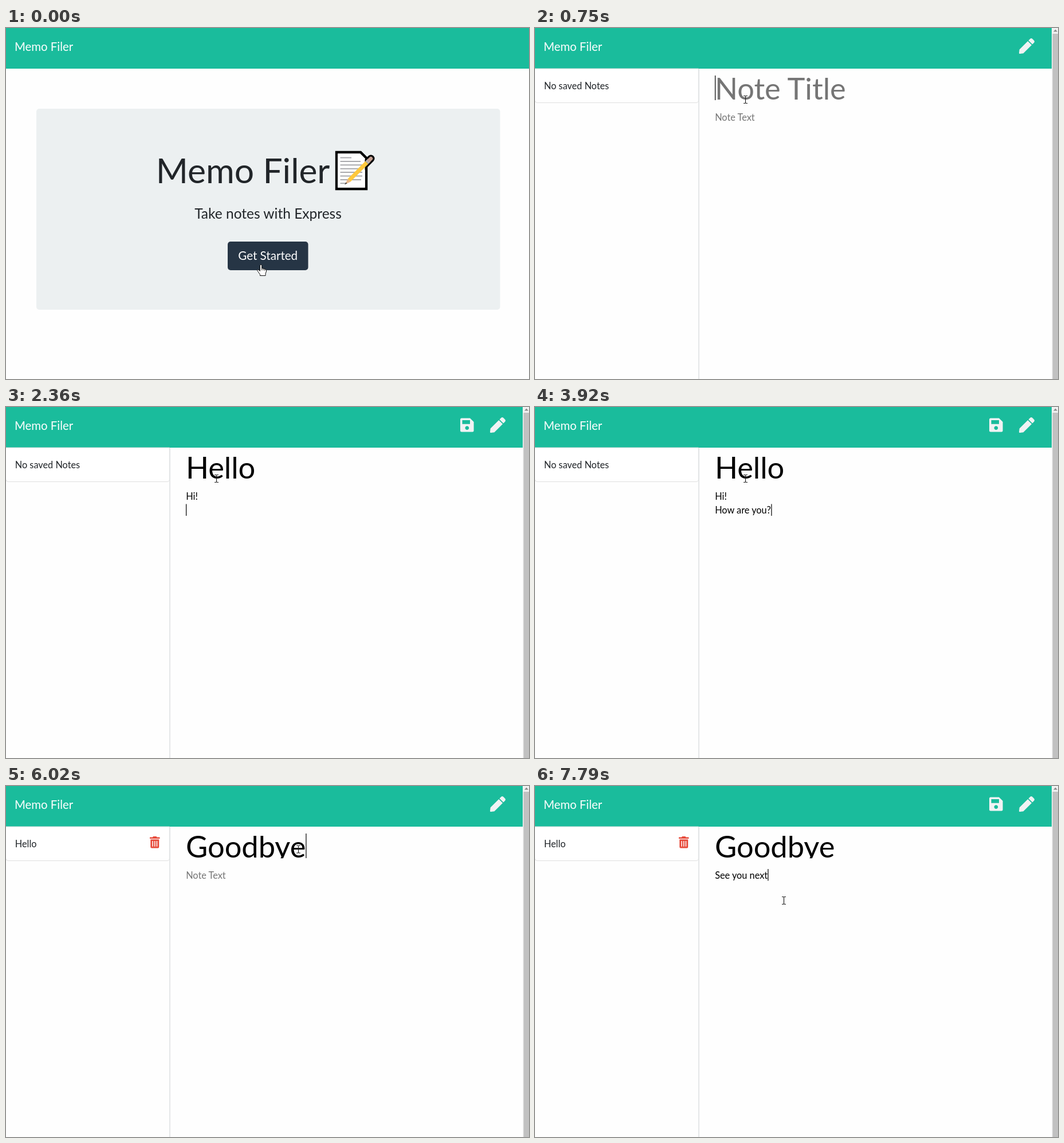
Recreate the animation shown at these times as an HTML page. Size 913 by 613 pixels, loop 8000 ms.

```html
<!DOCTYPE html>
<html lang="en">
<head>
<meta charset="utf-8">
<title>Memo Filer</title>
<style>
  html, body { margin: 0; width: 100%; height: 100%; overflow: hidden; background: #fefefe; }
  svg { display: block; width: 913px; height: 613px; }
  text { font-family: Lato, sans-serif; font-size: 16.3px; fill: #212529; white-space: pre; }
  .brand { font-size: 20.4px; fill: #fff; }
  .icon { fill: #f0f3f4; fill-rule: evenodd; }
  .big { font-size: 52.4px; }
</style>
</head>
<body>
<svg viewBox="0 0 913 613">
  <defs>
    <clipPath id="titleBox"><rect x="300" y="76" width="600" height="50.3"/></clipPath>
  </defs>
  <rect width="913" height="613" fill="#fefefe"/>
  <rect width="913" height="71" fill="#1abc9c"/>
  <text class="brand" x="14.9" y="40">Memo Filer</text>

  <g id="home">
    <rect x="53" y="141" width="809.5" height="351" rx="5" fill="#ecf0f1"/>
    <text x="261.8" y="271" style="font-size:60.5px">Memo Filer</text>
    <g id="memo">
      <path d="M577 217H619L629 227V281H577Z" fill="#fff" stroke="#000" stroke-width="4.4"/>
      <path id="lines" stroke="#a9a9ad" stroke-width="2"/>
      <path d="M603 262L637 228" stroke="#000" stroke-width="13" stroke-linecap="round"/>
      <path d="M579 219.5H618L626.5 228V278.500H579Z" fill="#fff"/>
      <use href="#lines"/>
      <path d="M599 266L630 235" stroke="#ffc83d" stroke-width="7"/>
      <path d="M630 235L634 231" stroke="#b4b4b8" stroke-width="7"/>
      <path d="M634 231L637 228" stroke="#c4a092" stroke-width="6.500" stroke-linecap="round"/>
      <path d="M596.5 263.500L601.5 268.500L592 273Z" fill="#e8b98c"/>
      <path d="M593.500 269.500L595.500 271.500L591 273.500Z" fill="#444"/>
    </g>
    <text x="457.5" y="332.500" text-anchor="middle" style="font-size:24.5px">Take notes with Express</text>
    <rect id="ring" x="384" y="370" width="146.500" height="56" rx="7" fill="#8c969f"/>
    <rect id="button" x="387" y="373" width="140.500" height="50" rx="5"/>
    <text x="457.200" y="405" text-anchor="middle" style="font-size:20.6px;fill:#fff">Get Started</text>
  </g>

  <g id="notes">
    <path d="M0 71H285.500V126Q285.500 130.500 281 130.500H4Q0 130.500 0 127" fill="#fff" stroke="#dfdfdf"/>
    <path d="M286 71V613" stroke="#dfe1e3" stroke-width="1.600"/>
    <text id="saved" x="15.8" y="106.800"></text>
    <path id="trash" fill="#e74c3c" fill-rule="evenodd"
      d="M251 89.500H256L257 88H262.500L263.500 89.500H268.500V92H251ZM252.300 93.300H267.200V106.500Q267.200 108.500 265.200 108.500H254.300Q252.300 108.500 252.300 106.500ZM255.300 96V105.800H256.800V96ZM259 96V105.800H260.500V96ZM262.700 96V105.800H264.200V96Z"/>
    <path class="icon" d="M860.300 22.900L867.100 29.700L852.500 44.300L846.500 45Q844.800 45.100 845 43.500L845.700 37.500ZM861.500 21.700L864.500 18.700Q866.300 17.200 868.100 18.700L871.300 21.900Q872.800 23.700 871.300 25.500L868.300 28.500Z"/>
    <path id="save" class="icon"
      d="M795.500 19.500H810L816.600 26V41Q816.600 43.500 814.100 43.500H795.500Q793 43.500 793 41V22Q793 19.500 795.500 19.500ZM796.500 23V29.700H810V23ZM804.800 33.200A3.400 3.400 0 1 0 804.900 33.200Z"/>
    <g clip-path="url(#titleBox)"><text id="title" class="big" x="314" y="125"></text></g>
    <text id="line1" x="314.2" y="161.600"></text>
    <text id="line2" x="314.2" y="186"></text>
    <rect id="caret" width="1.200" fill="#000"/>
    <rect x="902" width="11" height="613" fill="#f1f1f1"/>
    <rect x="903.500" y="10" width="9.500" height="603" fill="#c1c1c1"/>
    <path d="M905 6.500L908.500 2.500L912 6.500Z" fill="#8a8a8a"/>
  </g>

  <g id="hand">
    <path d="M-1.600 1.500Q0 -1 1.600 1.500V6.500L4 7L6.500 7.800L8.800 9Q9.800 9.500 9.500 12L8 16V19.500H-1.500V17.500L-5 12.500Q-7.500 9.500 -5.500 9Q-4.300 8.700 -1.600 11.500Z"
      fill="#fff" stroke="#111" stroke-linejoin="round"/>
    <path d="M1.600 6.500V10M4.200 7.300V10.300M6.700 8V10.800" stroke="#111" stroke-width=".9"/>
  </g>
  <path id="beam" d="M-3.500 -6.500H-1L0 -5.800L1 -6.500H3.500M0 -5.800V5.800M-3.500 6.500H-1L0 5.800L1 6.500H3.500" fill="none" stroke="#222" stroke-width="1.200"/>
  <path id="arrow" d="M0 0V14.200L3.300 11.200L5.600 16.500L8 15.400L5.700 10.300H10Z" fill="#fff" stroke="#111" stroke-linejoin="round"/>
</svg>
<script>
const LOOP = 8000;
const $ = id => document.getElementById(id);
const pen = document.createElement("canvas").getContext("2d");

// Each step lists only what changes at that time.
const steps = [
  { at: 0, page: "home", press: false, cursor: ["hand", 445, 413], saved: "No saved Notes",
    bin: false, title: "", line1: "", line2: "", focus: "title" },
  { at: 250, cursor: ["hand", 450, 400] },
  { at: 500, press: true },
  { at: 750, page: "notes", cursor: ["beam", 367.5, 125] },
  { at: 1320, title: "H" },
  { at: 1590, title: "Hel" },
  { at: 1840, title: "Hello" },
  { at: 2110, line1: "Hi", focus: "line1" },
  { at: 2360, line1: "Hi!", focus: "line2" },
  { at: 2610, line2: "H" },
  { at: 2880, line2: "How" },
  { at: 3150, line2: "How a" },
  { at: 3400, line2: "How are " },
  { at: 3670, line2: "How are yo" },
  { at: 3920, line2: "How are you?" },
  { at: 4170, cursor: ["arrow", 690, 54] },
  { at: 4420, cursor: ["hand", 802, 32] },
  { at: 4950, cursor: ["arrow", 802, 31.500], saved: "Hello", bin: true,
    title: "", line1: "", line2: "", focus: "" },
  { at: 5220, cursor: ["beam", 510.5, 110.5] },
  { at: 5490, title: "Go", focus: "title" },
  { at: 5740, title: "Goodb" },
  { at: 6020, title: "Goodbye" },
  { at: 6270, cursor: ["beam", 434.5, 200] },
  { at: 6520, focus: "line1" },
  { at: 6770, line1: "S" },
  { at: 7020, line1: "See y" },
  { at: 7270, line1: "See you" },
  { at: 7520, line1: "See you n" },
  { at: 7790, line1: "See you next" }
];

// Caret boxes: top, height, font size
const fields = { title: [83, 43, 52.4], line1: [145, 20.5, 16.3], line2: [169.5, 20.5, 16.3] };

$("lines").setAttribute("d", Array.from({ length: 8 }, (_, i) =>
  `M583.5 ${226.5 + i * 6.4}H${[603, 619, 622, 622, 622, 622, 620, 594][i]}`).join(""));

const show = (id, on) => { $(id).style.display = on ? "" : "none"; };

function write(id, text, hint = "") {
  $(id).textContent = text || hint;
  $(id).style.fill = text ? "#000" : "#757575";
}

function placeCaret(s) {
  show("caret", s.focus);
  if (!s.focus) return;
  const [top, height, size] = fields[s.focus];
  pen.font = `${size}px Lato, sans-serif`;
  $("caret").setAttribute("x", 314 + pen.measureText(s[s.focus]).width);
  $("caret").setAttribute("y", top);
  $("caret").setAttribute("height", height);
}

function render(time) {
  const s = Object.assign({}, ...steps.filter(step => step.at <= time));
  show("home", s.page === "home");
  show("notes", s.page === "notes");
  show("ring", s.press);
  $("button").setAttribute("fill", s.press ? "#1e2b37" : "#263545");

  $("saved").textContent = s.saved;
  show("trash", s.bin);
  show("save", s.title && s.line1);
  write("title", s.title, "Note Title");
  write("line1", s.line1, "Note Text");
  write("line2", s.line2);
  placeCaret(s);

  const [kind, x, y] = s.cursor;
  for (const id of ["hand", "beam", "arrow"]) show(id, id === kind);
  $(kind).setAttribute("transform", `translate(${x} ${y})`);
}

const start = performance.now();
function tick() {
  render((performance.now() - start) % LOOP);
  requestAnimationFrame(tick);
}
tick();
</script>
</body>
</html>
```
